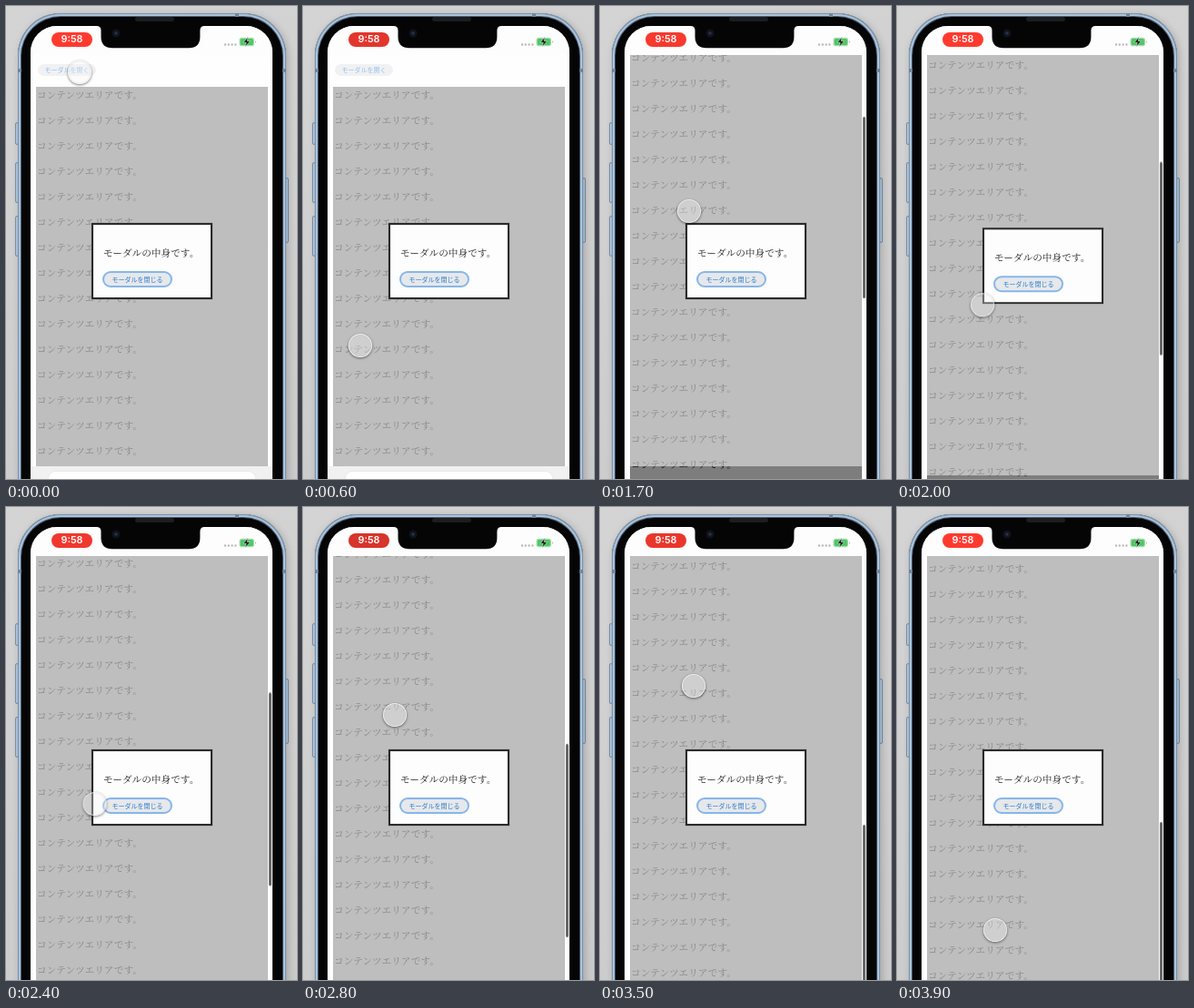
Write an HTML page that moves like this. It is 320x521 px and loops after 4 s.

```html
<!DOCTYPE html>
<html lang="ja">
<head>
<meta charset="utf-8">
<title>モーダル</title>
<style>
html, body { margin: 0; width: 100%; height: 100%; overflow: hidden; }
body { background: #cfcfcf; }
#stage {
  position: relative; width: 320px; height: 521px; overflow: hidden;
  background: linear-gradient(160deg, #d4d4d4, #cbcbcb);
  font: 10.67px/18px "Noto Serif CJK JP", "Noto Sans CJK JP", "Noto Sans CJK", serif;
}
#stage div, #stage svg { position: absolute; box-sizing: border-box; }
.key { width: 4px; background: #b3cbe2; border: 1px solid #7f93a8; border-radius: 2px; }
.body {
  left: 13px; top: 8px; width: 295px; height: 600px; border-radius: 47px;
  background: #050506;
  box-shadow: inset 0 0 0 1px #7d90a4, inset 0 0 0 3px #a9c4de,
    inset 0 0 0 4px #4d5d70, 2px 2px 9px #0003;
}
.band { background: #71869c; }
.screen {
  left: 27px; top: 22px; width: 266px; height: 560px;
  border-radius: 29px; background: #fdfdfd; overflow: hidden;
}
/* layers inside the screen keep stage coordinates */
.layer { left: -27px; top: -22px; width: 320px; height: 600px; }
.page { left: 0; top: 0; width: 320px; height: 1500px; animation: scroll 4s infinite linear; }
.area { left: 33px; top: 88.5px; width: 254.5px; height: 1412px; background: #7d7d7d; color: #0a0a0a; }
.area p { margin: 0 0 10px 1px; height: 18px; white-space: nowrap; }
.btn {
  font-family: "Noto Sans CJK JP", "Noto Sans CJK", sans-serif; font-size: 7px;
  border-radius: 10px; text-align: center; white-space: nowrap;
}
.open { left: 35px; top: 64px; width: 64px; height: 12.5px; line-height: 12px; background: #e3e3e6; color: #2480d8; }
.veil { left: 27px; top: 22px; width: 266px; height: 485px; background: #ffffff80; animation: veil 4s infinite linear; }
.status { left: 27px; top: 22px; width: 266px; height: 32px; background: #fdfdfd; }
.modal {
  left: 93.5px; top: 239px; width: 133.5px; height: 83.5px;
  background: #fdfdfd; border: 2px solid #2a2a2a; color: #1c1c1c;
  box-shadow: 0 0 1px #0006, inset 0 0 1px #0006;
  animation: modal 4s infinite linear;
}
.modal p { position: absolute; margin: 0; left: 11.5px; top: 22px; white-space: nowrap; }
.close {
  left: 10.5px; top: 51px; width: 77px; height: 18px; line-height: 14px;
  background: #e6e8eb; border: 2px solid #86b6ea; color: #2b7cc9;
}
.thumb {
  left: 289px; top: 54.4px; width: 2.5px; height: 187px; border-radius: 2px; background: #686868;
  animation: thumb 4s infinite linear;
}
.tools { left: 27px; top: 507px; width: 266px; height: 80px; background: #f1f1f1; animation: tools 4s infinite linear; }
.tools div { left: 20px; top: 6px; width: 227px; height: 32px; border-radius: 7px; background: #fff; box-shadow: 0 0 3px #0001; }
.clock {
  left: 50px; top: 29px; width: 45px; height: 16px; border-radius: 8px; color: #fff;
  font: 600 10.8px/16px Inter, Roboto, sans-serif; text-align: center;
  background: #ff3a2f; animation: pulse 2s infinite ease-in-out;
}
.touch {
  left: -13px; top: -13px; width: 26px; height: 26px; border-radius: 50%;
  background: #f6f6f650; border: 1.5px solid #f4f4f4e0;
  box-shadow: 0 1px 3px #0008, inset 0 0 1px #0003;
  animation: touch 4s infinite linear;
}
@keyframes scroll {
  0%, 31.5% { transform: none; }
  35% { transform: translateY(-12px); }
  42% { transform: translateY(-165px); animation-timing-function: ease-out; }
  50% { transform: translateY(-313px); }
  57% { transform: translateY(-345px); }
  65% { transform: translateY(-490px); animation-timing-function: ease-out; }
  70% { transform: translateY(-550px); }
  78% { transform: translateY(-602px); }
  85% { transform: translateY(-755px); animation-timing-function: ease-out; }
  87.5% { transform: translateY(-789px); }
  90%  { transform: translateY(-791px); }
  97.5%, 100% { transform: translateY(-786px); }
}
@keyframes thumb {
  0%, 31.5% { transform: none; opacity: 0; height: 187px; }
  32.5% { opacity: 1; }
  35% { transform: translateY(4.6px); height: 187px; }
  42% { transform: translateY(62px); animation-timing-function: ease-out; }
  50% { transform: translateY(117.6px); height: 213px; }
  57% { transform: translateY(129.7px); }
  65% { transform: translateY(184.2px); animation-timing-function: ease-out; }
  70% { transform: translateY(206.8px); }
  78% { transform: translateY(226.3px); }
  85% { transform: translateY(283.8px); animation-timing-function: ease-out; }
  87.5% { transform: translateY(296px); }
  97.5%, 100% { transform: translateY(293px); opacity: 1; height: 213px; }
}
@keyframes touch {
  0% { transform: translate(81px, 73px); animation-timing-function: ease-in-out; }
  15% { transform: translate(63px, 374px); animation-timing-function: ease-in-out; }
  31.5% { transform: translate(95px, 386px); }
  35% { transform: translate(96px, 374px); }
  42% { transform: translate(98px, 225px); animation-timing-function: ease-in-out; }
  50% { transform: translate(94px, 329px); animation-timing-function: ease-out; }
  57% { transform: translate(96px, 380px); }
  65% { transform: translate(100px, 240px); }
  70% { transform: translate(101px, 229px); animation-timing-function: ease-in-out; }
  78% { transform: translate(102px, 360px); }
  85% { transform: translate(103px, 206px); }
  87.5% { transform: translate(103px, 197px); animation-timing-function: ease-in-out; }
  97.5%, 100% { transform: translate(108px, 466px); }
}
@keyframes modal {
  0%, 49% { transform: none; }
  50% { transform: translateY(5px); }
  53%, 100% { transform: translateY(28px); }
}
@keyframes veil {
  0%, 49% { height: 485px; }
  50% { height: 495px; }
  53%, 100% { height: 541px; }
}
@keyframes tools {
  0%, 31.5% { transform: none; }
  35% { transform: translateY(10px); }
  38%, 100% { transform: translateY(70px); }
}
@keyframes pulse { 50% { background: #d3342b; } }
</style>
</head>
<body>
<div id="stage">
  <div class="key" style="left:10px;top:128px;height:25px"></div>
  <div class="key" style="left:10px;top:172px;height:45px"></div>
  <div class="key" style="left:10px;top:231px;height:45px"></div>
  <div class="key" style="left:307px;top:189px;height:72px"></div>
  <div class="body"></div>
  <div class="band" style="left:13px;top:69px;width:4px;height:4px"></div>
  <div class="band" style="left:304px;top:69px;width:4px;height:4px"></div>
  <div class="band" style="left:252px;top:8px;width:4px;height:4px"></div>
  <div class="screen">
    <div class="layer">
      <div class="page">
        <div class="btn open">モーダルを開く</div>
        <div class="area"></div>
      </div>
      <div class="veil"></div>
      <div class="status"></div>
      <div class="modal">
        <p>モーダルの中身です。</p>
        <div class="btn close">モーダルを閉じる</div>
      </div>
      <div class="thumb"></div>
      <div class="tools"><div></div></div>
      <div class="clock">9:58</div>
    </div>
  </div>
  <svg width="320" height="60" style="left:0;top:0">
    <path d="M99.5 20V22Q104.5 22 104.5 27V34Q104.5 46.2 117 46.2H201Q213.4 46.2 213.4 34V27Q213.4 22 218.4 22V20Z" fill="#050506"/>
    <rect x="142" y="12" width="43" height="5" rx="2.5" fill="#1d1d1f"/>
    <circle cx="121" cy="30" r="4.5" fill="#10131c"/>
    <circle cx="121" cy="30" r="1.8" fill="#26324a"/>
    <path d="M241 42.5H254" stroke="#b9b9b9" stroke-width="2.4" stroke-linecap="round" stroke-dasharray="0 3.8"/>
    <rect x="256.5" y="34.8" width="16.5" height="9.4" rx="2.8" fill="#a9dcb0"/>
    <rect x="257.7" y="36" width="14.1" height="7" rx="1.6" fill="#4cc763"/>
    <path d="M274 38q1.6 1.5 0 3z" fill="#8d8d8d"/>
    <path d="M266.2 34.2L260.8 40.2H264.2L263 45L268.6 38.6H265.2Z" fill="#111" stroke="#d8f2dc" stroke-width=".6"/>
  </svg>
  <div class="touch"></div>
</div>
<script>
document.querySelector('.area').innerHTML = '<p>コンテンツエリアです。</p>'.repeat(50);
</script>
</body>
</html>
```
